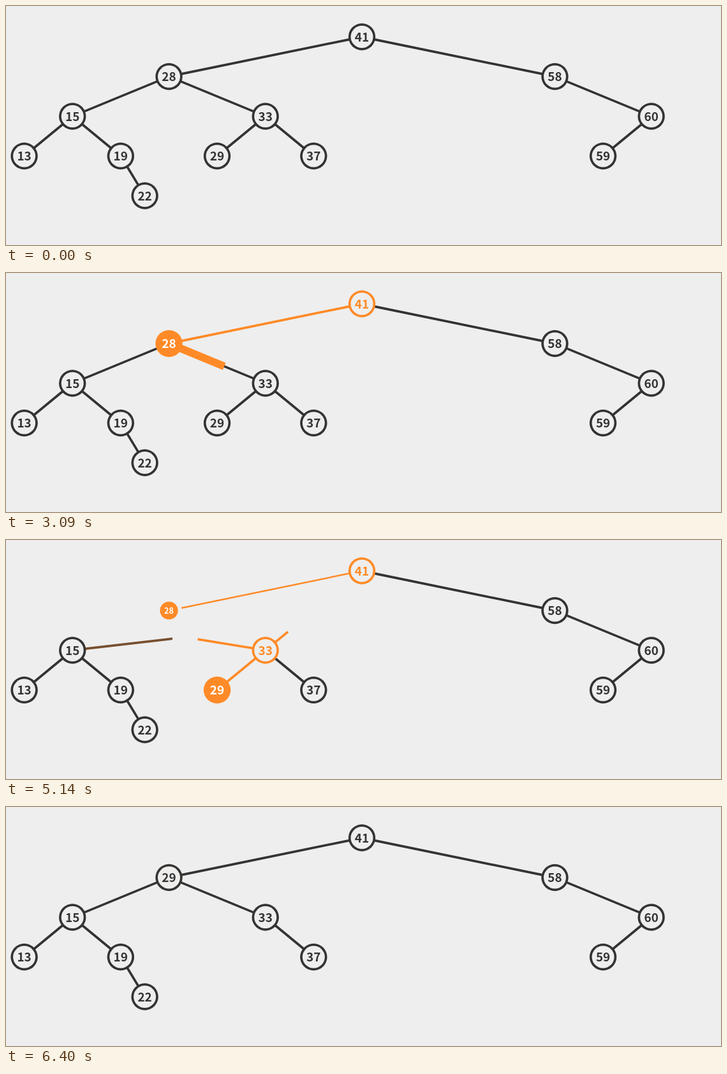
Recreate the animation shown at these times as an HTML page. Size 1121 by 376 pixels, loop 9.57 s.

```html
<!DOCTYPE html>
<html lang="en">
<head>
<meta charset="utf-8">
<title>Removing a vertex from a binary search tree</title>
<style>
  html, body { margin: 0; width: 100%; height: 100%; overflow: hidden; background: #eee; }
  svg { display: block; }
  text {
    font: 700 19px "Noto Sans CJK SC", "Noto Sans CJK JP", "Noto Sans CJK", "Open Sans", sans-serif;
    text-anchor: middle;
  }
</style>
</head>
<body>
<svg id="stage" width="1121" height="376" viewBox="0 0 1121 376"></svg>
<script>
const LOOP = 9570, FIRST = 1360, TICK = 157.5, LAST_TICK = 32;
const DURATION = 521, RADIUS = 20, LINE = 3.75, THICK = 12.2;

// Start of each step: visit 41, walk, visit 28, walk, visit 33, walk,
// visit 29, relink, move up, clear the highlights.
const STARTS = [1265, 1786, 2300, 2814, 3369, 3880, 4391, 4912, 5433, 5954];

const DARK = [51, 51, 51], BACK = [238, 238, 238], ORANGE = [255, 138, 39], WHITE = [255, 255, 255];
// A look is ring, fill and text colour in one list.
const PLAIN = [...DARK, ...BACK, ...DARK];
const HOT = [...ORANGE, ...ORANGE, ...WHITE];
const SEEN = [...ORANGE, ...BACK, ...ORANGE];

const spot = (x, level) => [x, 48.5 + 62.5 * level];
const home = {
  41: spot(558, 0), 28: spot(255.5, 1), 58: spot(860.5, 1),
  15: spot(104.2, 2), 33: spot(406.7, 2), 60: spot(1011.7, 2),
  13: spot(28.6, 3), 19: spot(179.8, 3), 29: spot(331, 3), 37: spot(482.3, 3), 59: spot(936.1, 3),
  22: spot(217.6, 4)
};
const parent = { 28: 41, 58: 41, 15: 28, 33: 28, 60: 58, 13: 15, 19: 15, 29: 33, 37: 33, 59: 60, 22: 19 };

// Lists of [step, new value].
const looks = {
  41: [[0, HOT], [1, SEEN], [9, PLAIN]],
  28: [[2, HOT]],
  33: [[4, HOT], [5, SEEN], [9, PLAIN]],
  29: [[6, HOT], [9, PLAIN]]
};
const moves = { 29: [[8, home[28]]] };
const relinks = {
  15: [[7, home[29]], [8, home[28]]],
  33: [[7, home[29]], [8, home[28]]],
  29: [[7, home[41]]]
};
const walks = { 28: 1, 33: 3, 29: 5 };

const stage = document.getElementById("stage");
function add(tag, host) {
  return host.appendChild(document.createElementNS("http://www.w3.org/2000/svg", tag));
}
function set(el, attrs) {
  for (const name in attrs) el.setAttribute(name, attrs[name]);
}

const edges = Object.keys(parent).map(id => ({ id, line: add("line", stage), trail: add("line", stage) }));
const nodes = Object.keys(home).map(id => {
  const group = add("g", stage);
  const ring = add("circle", group), disc = add("circle", group), label = add("text", group);
  set(ring, { r: 21.2 });
  set(disc, { r: 17.5 });
  set(label, { y: 7 });
  label.textContent = id;
  return { id, group, parts: [ring, disc, label] };
});

const rgb = c => `rgb(${c.map(Math.round)})`;
const mix = (a, b, k) => a.map((v, i) => v + (b[i] - v) * k);

function draw(time) {
  const progress = step => {
    const k = Math.min(1, Math.max(0, (time - STARTS[step]) / DURATION));
    return k < 0.5 ? 4 * k ** 3 : 1 - 4 * (1 - k) ** 3;
  };
  const follow = (value, changes = []) =>
    changes.reduce((v, [step, next]) => mix(v, next, progress(step)), value);

  for (const { id, line, trail } of edges) {
    const from = follow(home[parent[id]], relinks[id]), to = follow(home[id], moves[id]);
    const trim = RADIUS / Math.hypot(to[0] - from[0], to[1] - from[1]);
    const a = mix(from, to, trim), b = mix(to, from, trim);
    const walked = id in walks ? progress(walks[id]) : 0;

    let color = walked === 1 ? ORANGE : DARK;
    if (id === "15") color = mix(color, ORANGE, progress(7));
    color = mix(color, DARK, progress(9));
    const width = id === "28" ? LINE * (1 - progress(7)) : LINE;
    set(line, { x1: a[0], y1: a[1], x2: b[0], y2: b[1], stroke: rgb(color), "stroke-width": width });

    const tip = mix(a, b, walked);
    set(trail, {
      x1: a[0], y1: a[1], x2: tip[0], y2: tip[1], stroke: rgb(ORANGE),
      "stroke-width": walked > 0 && walked < 1 ? THICK : 0
    });
  }

  for (const { id, group, parts } of nodes) {
    const look = follow(PLAIN, looks[id]);
    const scale = id === "28" ? 1 - progress(7) : 1;
    set(group, { transform: `translate(${follow(home[id], moves[id])}) scale(${scale})` });
    parts.forEach((part, i) => set(part, { fill: rgb(look.slice(i * 3, i * 3 + 3)) }));
  }
}

function frame() {
  const now = performance.now() % LOOP;
  // The picture advances in even ticks and rests before and after them.
  const tick = Math.min(LAST_TICK, Math.floor((now - FIRST + 5) / TICK));
  draw(tick < 0 ? 0 : FIRST + tick * TICK);
  requestAnimationFrame(frame);
}
frame();
</script>
</body>
</html>
```
